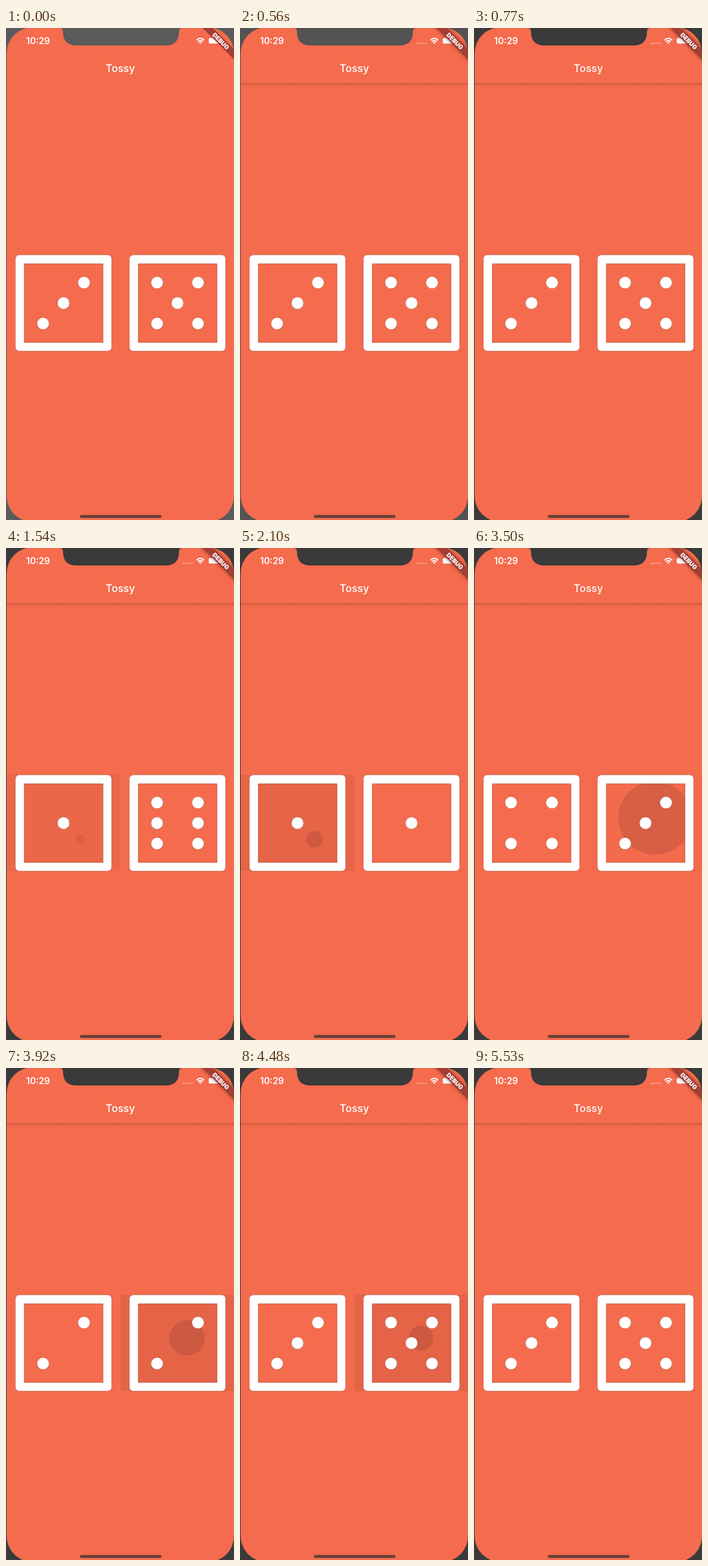
An HTML page for the animation above (5600 ms loop, 352 px wide and 760 px high).

```html
<!DOCTYPE html>
<html lang="en">
<head>
<meta charset="utf-8">
<title>Dice roller</title>
<style>
  html, body { margin: 0; width: 100%; height: 100%; overflow: hidden; background: #3a3a3a; }
  svg { display: block; width: 352px; height: 760px; }
  text { fill: #fff; text-anchor: middle; font-family: Inter, Roboto, sans-serif; }
</style>
</head>
<body>
<svg viewBox="0 0 352 760">
  <defs>
    <clipPath id="screen"><rect x="1" y="-1" width="351" height="764" rx="40"/></clipPath>
    <clipPath id="cellL"><rect x="1" y="350" width="175.500" height="149"/></clipPath>
    <clipPath id="cellR"><rect x="177" y="350" width="175" height="149"/></clipPath>
    <linearGradient id="fade" x2="0" y2="1">
      <stop stop-color="#5a1c10" stop-opacity=".32"/>
      <stop offset=".35" stop-color="#5a1c10" stop-opacity=".1"/>
      <stop offset="1" stop-color="#5a1c10" stop-opacity="0"/>
    </linearGradient>
    <filter id="blur" x="-30%" y="-100%" width="160%" height="300%"><feGaussianBlur stdDeviation="2.5"/></filter>
  </defs>

  <rect class="bezel" width="352" height="760"/>
  <g clip-path="url(#screen)">
    <rect width="352" height="760" fill="#f56b4d"/>
    <rect class="late" y="85.500" width="352" height="6" fill="url(#fade)"/>

    <text x="49.500" y="25" font-size="13.800" font-weight="600">10:29</text>
    <text x="176.500" y="68" font-size="16" font-weight="500">Tossy</text>
    <g class="late" fill="#fff" fill-opacity=".35">
      <circle cx="274" cy="23.500" r="1.500"/><circle cx="278.500" cy="23.500" r="1.500"/>
      <circle cx="282.700" cy="23.500" r="1.500"/><circle cx="287" cy="23.500" r="1.500"/>
    </g>
    <g fill="none" stroke="#fff" stroke-width="2">
      <path d="M294.200 18.800Q300 13.200 305.800 18.800M296.400 21.300Q300 17.900 303.600 21.300"/>
      <path d="M300 24.800l-2-2.100q2-1.600 4 0z" fill="#fff" stroke="none"/>
    </g>
    <rect x="313" y="15.500" width="18" height="8.500" rx="2.300" fill="#fff"/>

    <g transform="translate(352 0) rotate(45)">
      <rect class="late" x="-42" y="23" width="84" height="11.300" opacity=".5" filter="url(#blur)"/>
      <rect x="-42" y="23" width="84" height="11.300" fill="#a33f35"/>
      <text y="32" font-size="9.200" font-weight="900">DEBUG</text>
    </g>

    <g id="ink"></g>
    <g id="dice"></g>
    <rect x="114" y="752.300" width="126" height="4.400" rx="2.200" fill="#63403a"/>
  </g>
  <path class="bezel" d="M83 0Q88 0 88 6Q88 27 109 27H246Q267 27 267 6Q267 0 272 0Z"/>
</svg>

<script>
const LOOP = 5600, STEP = 70;

// Pips on a 3 x 3 grid, cells numbered row by row.
const FACES = { 1: [4], 2: [2, 6], 3: [2, 4, 6], 4: [0, 2, 6, 8], 5: [0, 2, 4, 6, 8], 6: [0, 2, 3, 5, 6, 8] };

// Time in ms, left face, right face.
const ROLLS = [[0, 3, 5], [1470, 1, 6], [2030, 1, 1], [3220, 4, 3], [3850, 2, 2], [4410, 3, 5]];

// Press time, side, end of the highlight and of the splash after the press.
const TAPS = [
  [1495, 0, 300, 330], [2028, 0, 280, 300],
  [3189, 1, 325, 480], [3770, 1, 325, 480], [4375, 1, 325, 480]
];
const SPOTS = [[115, 450], [279.5, 417]];
const SPEED = 0.182;

const clamp = v => Math.max(0, Math.min(1, v));
const ramp = (t, from, to) => clamp((t - from) / (to - from));
const $ = id => document.getElementById(id);

function add(parent, tag, attrs) {
  const el = document.createElementNS('http://www.w3.org/2000/svg', tag);
  for (const key in attrs) el.setAttribute(key, attrs[key]);
  return parent.appendChild(el);
}

const dice = [0, 176].map(dx => {
  const g = add($('dice'), 'g', { transform: `translate(${dx} 0)`, fill: '#fff', stroke: '#80483c', 'stroke-opacity': .5, 'stroke-width': .7 });
  add(g, 'path', {
    'fill-rule': 'evenodd',
    d: 'M20.500 350.500H157a6 6 0 0 1 6 6V493a6 6 0 0 1-6 6H20.500a6 6 0 0 1-6-6V356.500a6 6 0 0 1 6-6ZM28 364V486H150V364Z'
  });
  return Array.from({ length: 9 }, (_, i) =>
    add(g, 'circle', { cx: 57.2 + i % 3 * 31.6, cy: 393.3 + Math.floor(i / 3) * 31.6, r: 9.3 }));
});

const inks = SPOTS.map(([cx, cy], side) => {
  const g = add($('ink'), 'g', { 'clip-path': `url(#cell${'LR'[side]})` });
  return {
    glow: add(g, 'rect', { x: side * 176, y: 350, width: 177, height: 149 }),
    splash: add(g, 'circle', { cx, cy, r: 0 })
  };
});

function render(t) {
  const grey = Math.round(91 - 33 * ramp(t, 490, 770));
  document.querySelectorAll('.bezel').forEach(el => el.setAttribute('fill', `rgb(${grey},${grey},${grey})`));
  document.querySelectorAll('.late').forEach(el => {
    el.style.opacity = ramp(t, 0, 280) * (el.hasAttribute('filter') ? .5 : 1);
  });

  const roll = ROLLS.filter(r => r[0] <= t).pop();
  dice.forEach((pips, side) => pips.forEach((pip, i) => {
    pip.style.display = FACES[roll[side + 1]].includes(i) ? '' : 'none';
  }));

  inks.forEach(({ glow, splash }, side) => {
    const tap = TAPS.filter(p => p[1] === side && p[0] <= t).pop();
    const age = tap ? t - tap[0] : 0;
    const glowEnd = tap ? tap[2] : 1, splashEnd = tap ? tap[3] : 1;
    const rise = tap ? ramp(age, 0, 75) : 0;
    glow.setAttribute('fill-opacity', .065 * rise * (1 - ramp(age, glowEnd - 120, glowEnd)));
    splash.setAttribute('fill-opacity', .11 * rise * (1 - ramp(age, splashEnd - 160, splashEnd)));
    splash.setAttribute('r', age * SPEED);
  });
}

const start = performance.now();
function tick() {
  const t = (performance.now() - start) % LOOP;
  render(Math.floor(t / STEP) * STEP);
  requestAnimationFrame(tick);
}
tick();
</script>
</body>
</html>
```
